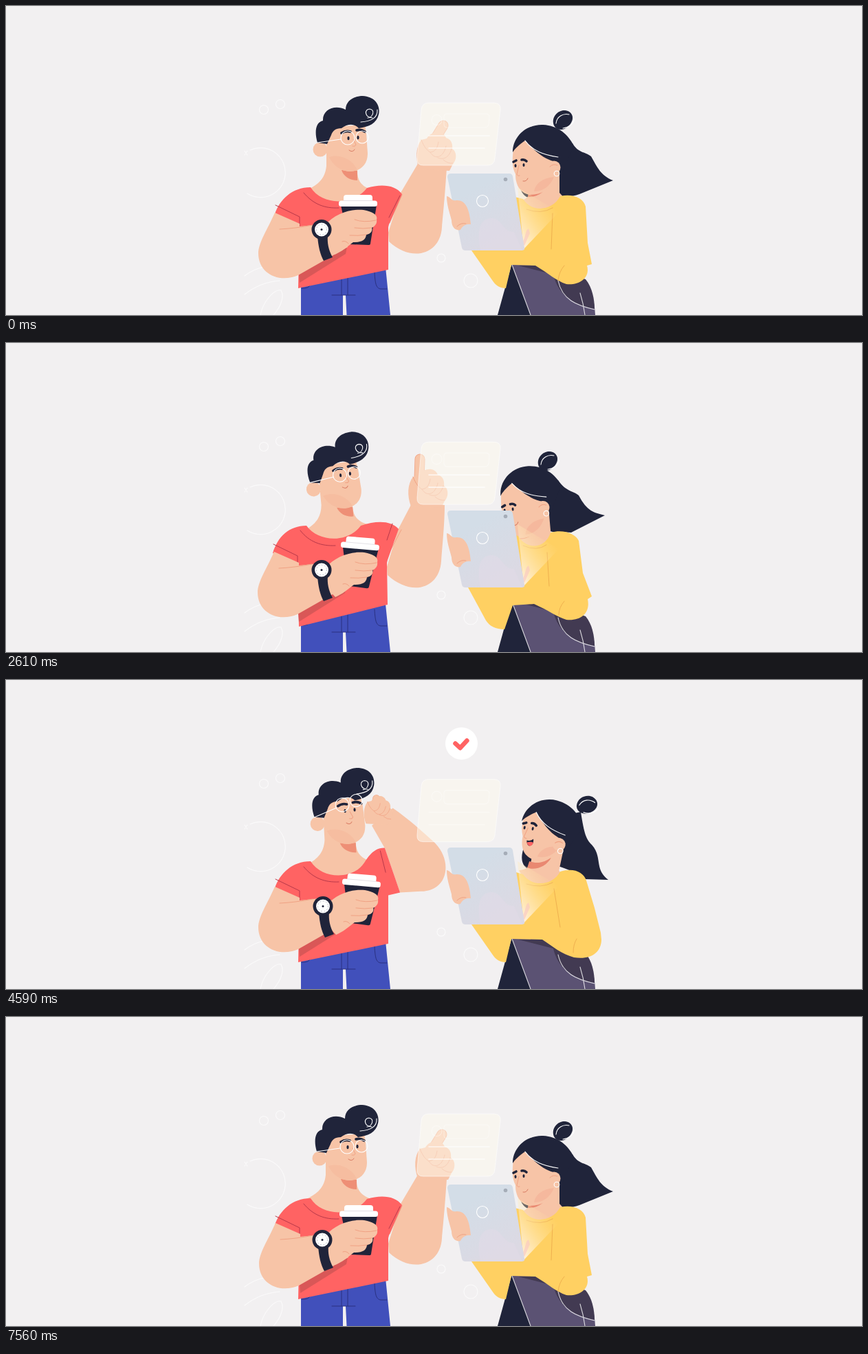
These frames come from a looping animation (1245x450 px, 7.59 s). An HTML page:

```html
<!DOCTYPE html>
<html lang="en">
<head>
<meta charset="utf-8">
<title>Two people with a tablet</title>
<style>
  html, body { margin: 0; width: 100%; height: 100%; overflow: hidden; background: #f2f0f1; }
  svg { display: block; width: 100vw; height: 100vh; }
  .skin { fill: #f7c4a7; }
  .navy { fill: #20243a; }
  .red { fill: #ff6363; }
  .white { fill: #fff; }
  .line { fill: none; stroke-linecap: round; stroke-linejoin: round; }
  .fold { stroke: #f0a284; stroke-width: 1; }
  .seam { stroke: #b8394a; stroke-width: 1; }
  .chalk { stroke: #fff; stroke-width: 1.1; }
  .brow { stroke: #20243a; stroke-width: 3.6; }
</style>
</head>
<body>
<svg viewBox="0 0 1245 450">
  <defs>
    <linearGradient id="glass" x1="0" y1="0" x2=".6" y2="1">
      <stop offset=".3" stop-color="#d3dde7"/><stop offset="1" stop-color="#dcd9e3"/>
    </linearGradient>
    <linearGradient id="glow" x1="0" y1=".8" x2=".7" y2=".1">
      <stop offset="0" stop-color="#fff4e8" stop-opacity=".9"/><stop offset="1" stop-color="#ffe39a" stop-opacity="0"/>
    </linearGradient>
  </defs>

  <g class="line chalk" opacity=".65">
    <circle cx="375" cy="151" r="6.5"/><circle cx="399" cy="143" r="6.5"/>
    <circle cx="633" cy="367" r="6"/><circle cx="676" cy="400" r="10"/>
    <path d="M355 210A36 36 0 1 1 351 273M347 211L351 217M351 211L347 217M347 393Q360 383 375 380M347 420Q370 402 398 400M370 450C374 430 390 412 400 414C406 424 398 440 389 450"/>
  </g>

  <!-- Man -->
  <path fill="#4150bb" d="M429 400L552 380L559 450H495.500L494 421H490V450H429Z"/>
  <path class="line" stroke="#2a3080" d="M474 421H508M488 396V421M497 396V421M536 388C537 404 538 411 545 412H554M430 411Q441 412 443 405"/>
  <g id="manHead">
    <path class="skin" d="M466 212V233C464 252 454 260 438 268C460 304 512 300 532 268C516 262 511 254 511 240V212Z"/>
    <path fill="#ee8f76" d="M488 239L511 240V254C500 254 491 248 488 239Z"/>
    <circle class="skin" cx="457" cy="209" r="10.500"/>
    <path class="skin" d="M466 200L474 176L522 173L524 185L526 215C526 233 513 241 500 241C482 240 470 226 467 214Z"/>
    <path fill="#f6bda0" d="M470 220C484 215 504 222 511 239C492 245 477 235 470 220Z"/>
    <path class="navy" d="M453 199C448 182 451 169 461 167C460 151 478 143 494 151C494 137 507 131 519 131C537 132 545 145 542 158C539 171 528 176 513 178C507 171 497 171 488 178C479 178 475 182 473 188L467 201Z"/>
    <path class="line chalk" d="M533 163C521 162 521 150 529 150C538 151 533 163 526 163M540 151C541 163 531 168 516 169"/>
    <path class="line brow" d="M488 185Q494 181 501 183M510 181Q516 179 522 183"/>
    <ellipse class="navy" cx="498" cy="192.500" rx="1.600" ry="2.700"/><ellipse class="navy" cx="512" cy="191.500" rx="1.600" ry="2.700"/>
    <path class="line fold" d="M505 194L509 202Q508 205 504 204"/>
    <path id="manSmile" class="line" stroke="#d87a62" d="M499 210Q504 214 507 209"/>
    <g id="manMouth"><path class="navy" d="M501 207Q505 210 510 209Q510 217 506 217Q502 215 501 207Z"/><path class="red" d="M502 212Q506 210 510 211Q509 217 506 217Q503 216 502 212Z"/></g>
    <g id="glasses" class="line chalk"><circle cx="497" cy="192" r="10"/><circle cx="518" cy="191" r="9"/><path d="M453 199L487 194"/></g>
  </g>
  <path id="manArm" class="skin"/>
  <path id="armFold" class="line fold"/>
  <g id="hand">
    <path id="finger" class="line" stroke="#f0a284" stroke-width="15"/>
    <path class="skin" d="M601 238C595 222 596 205 604 195L612 193C616 184 635 178 640 192C648 194 650 202 649 208C656 212 656 224 650 230L645 240Z"/>
    <path id="fingerSkin" class="line" stroke="#f7c4a7" stroke-width="13.400"/>
    <path class="line fold" d="M604 195C608 205 612 210 617 213C626 212 628 204 629 198M617 213C625 226 637 219 640 204M628 221C638 225 645 219 648 208M636 224Q643 230 650 229"/>
  </g>
  <path id="shirt" class="red"/>
  <path id="shirtSeams" class="line seam"/>
  <g id="frontArm">
    <path fill="#d95757" d="M426 390L497 346L494 361L427 403Z"/>
    <g id="cup">
      <path class="navy" d="M487 290H539L530 346Q530 348 527 348L499 347Z"/>
      <rect class="white" x="491" y="275" width="42" height="14" rx="4"/><rect class="white" x="484" y="283.500" width="56" height="8.500" rx="3.500"/>
      <path class="line" stroke="#e3e1e6" d="M491 283.500H533"/>
    </g>
    <path class="skin" d="M391 301C380 326 367 345 367 360C367 390 397 404 425 392L497 351L490 330L466 317L427 321V317Z"/>
    <path class="line fold" d="M398 325Q420 324 446 319"/>
    <g id="grip">
      <path class="skin" d="M464 319C478 303 500 295 520 297C535 300 541 305 539 311C540 318 536 321 532 323C534 329 528 333 524 333C523 341 518 344 505 344C497 350 488 358 478 362L462 345Z"/>
      <path class="line fold" d="M507 311Q520 316 538 312M507 323Q519 325 532 323M500 334Q512 335 524 333M498 346Q494 341 489 343"/>
    </g>
    <g id="watch">
      <path class="navy" d="M453 334C454 350 457 362 462 371L475 366C469 355 467 345 468 334Z"/>
      <circle class="navy" cx="459" cy="325.500" r="14.500"/><circle class="white" cx="459" cy="325.500" r="10"/>
      <circle class="line" stroke="#b9bbc6" stroke-dasharray="1 3.400" cx="459" cy="325.500" r="7.500"/><circle class="navy" cx="459" cy="325.500" r="1.500"/>
    </g>
  </g>

  <!-- Floating panel -->
  <g id="panel">
    <path fill="#fffced" fill-opacity=".5" stroke="#fff" stroke-opacity=".55" d="M615 141H709Q720 141 719 151L711 222Q710 232 700 232H607Q597 232 598 222L604 151Q605 141 615 141Z"/>
    <g class="line chalk">
      <path opacity=".35" d="M641 157H698Q703 157 703 162L702 172Q701 177 696 177H642Q637 177 637 172V162Q637 157 641 157M634 166a7.500 7.500 0 1 1-15 0a7.500 7.500 0 1 1 15 0"/>
      <path id="rows" stroke-width="1.600" d="M615 189H703M615 207H696"/>
    </g>
  </g>

  <!-- Woman -->
  <path class="navy" d="M736 374L715 450H766Z"/>
  <path fill="#5b5273" d="M736 377H780L838 396C852 412 856 430 857 450H763Z"/>
  <path fill="#423a52" d="M745 378H784L843 398C853 410 856 428 856 441C828 436 803 422 796 391Z"/>
  <path class="line chalk" stroke-opacity=".8" d="M736 377L763 450M803 400C809 428 830 436 856 442M835 418Q840 434 842 450"/>
  <path id="tail" class="navy"/>
  <g id="womanHead">
    <path class="navy" d="M748 250C746 265 750 276 760 279L774 270Z"/>
    <path class="skin" d="M748 284C764 279 763 270 762 260L805 240V272L816 284C794 308 764 304 748 284Z"/>
    <path fill="#e98871" d="M760 268C773 270 783 264 790 256C786 270 773 279 759 278Z"/>
    <g id="womanFace">
      <path class="skin" d="M738 208C736 225 736 235 741 245C741 260 747 272 761 275C782 275 800 263 803 244L800 205L758 188Z"/>
      <path fill="#f5b89d" d="M768 270C770 257 783 250 797 249C791 263 781 270 768 270Z"/>
      <path class="line brow" stroke-width="2.500" d="M738 227L742 225M750 224Q754 223 757 226"/>
      <ellipse class="navy" cx="741" cy="232.500" rx="1.500" ry="2.500"/><ellipse class="navy" cx="753" cy="231.500" rx="1.500" ry="2.500"/>
      <path class="line fold" d="M746 232L743 245Q744 248 747 247"/>
      <path id="womanSmile" class="line" stroke="#d87a62" d="M752 255Q757 256 759 251"/>
      <g id="womanMouth"><path class="navy" d="M748 250Q754 250 757 246Q760 255 753 257Q749 256 748 250Z"/><path class="red" d="M748.500 253Q754 250 758 251Q757 257 753 257Q750 256 748.500 253Z"/></g>
    </g>
    <path class="navy" d="M737 213C737 190 757 172 781 173C803 174 818 187 826 204L808 244C803 239 806 226 796 226C786 223 774 217 755 196C746 202 740 208 737 213Z"/>
    <path class="line chalk" d="M755 196C766 211 782 217 803 220"/>
    <circle class="skin" cx="797" cy="235" r="9.500"/><path class="line fold" d="M791 234Q796 229 802 232"/>
    <circle class="line chalk" stroke-width="1.800" cx="801" cy="244" r="3.800"/>
  </g>
  <g id="bun">
    <path class="navy" d="M-13 8C-18 -5 -6 -15 3 -14C13 -13 17 -4 12 4C8 11 1 14 -2 14Q-10 14 -13 8Z"/>
    <path class="line chalk" d="M-10 5C-9 -5 0 -10 9 -8M0 12Q14 10 17 -2"/>
  </g>
  <path id="torso" fill="#ffd062"/>
  <path id="sleeveFold" class="line" stroke="#efb04f"/>
  <path fill="url(#glow)" d="M744 264L804 300L753 354Z"/>
  <path fill="#f9c8c2" opacity=".65" d="M750 345C757 337 754 328 760 324L762 331L754 349Z"/>
  <g id="tablet">
    <path fill="url(#glass)" d="M647 244H732Q736 244 737 248L754 352Q755 356 750 356H668Q664 356 663 352L642 249Q642 244 647 244Z"/>
    <path fill="#e2d9e6" opacity=".45" d="M690 356C684 325 690 309 706 309C721 308 723 330 739 329L751 356Z"/>
    <circle cx="726.500" cy="252.500" r="2.800" fill="#a5adb8"/><circle class="line chalk" cx="693" cy="284" r="8.500"/>
    <path class="skin" d="M641 277C647 278 648 285 655 283C667 282 674 293 676 318C669 317 664 320 661 326C654 328 648 322 648 312C645 300 641 290 641 277Z"/>
    <path class="line fold" d="M656 321Q662 315 669 317"/>
  </g>

  <g id="badge">
    <circle class="white" r="23.500"/>
    <path id="tick" class="line" stroke="#ff6363" stroke-width="6.500" stroke-dasharray="29 60" d="M-9 0L-2 6.500L10 -6.500"/>
  </g>
</svg>
<script>
const LOOP = 7590;
const NUMBER = /-?\d+(\.\d+)?/g;
const byId = id => document.getElementById(id);
const ease = k => k * k * (3 - 2 * k);

// Blend two strings that share the same layout of numbers.
function blend(a, b, k) {
  const goals = b.match(NUMBER);
  let i = 0;
  return a.replace(NUMBER, v => (+v + (goals[i++] - v) * k).toFixed(2));
}

function sample(keys, poses, t) {
  const next = keys.findIndex(key => key[0] > t);
  const [t0, a] = keys[next - 1], [t1, b] = keys[next];
  return blend(poses[a], poses[b], ease((t - t0) / (t1 - t0)));
}

// Keys are [time, pose]; repeated poses hold.
const manKeys = [[0, 0], [100, 0], [700, 1], [1600, 1], [2250, 2], [3150, 2], [3750, 3],
  [4100, 3], [4700, 4], [6300, 4], [7050, 5], [LOOP, 5]];
const womanKeys = [[0, 0], [700, 0], [1300, 1], [2650, 1], [3600, 2], [4000, 2], [4500, 3],
  [5500, 3], [6100, 4], [6300, 4], [6950, 0], [LOOP, 0]];
const torsoKeys = [[0, 0], [700, 0], [1300, 1], [1700, 1], [2200, 2], [2650, 2], [3400, 1],
  [4000, 1], [4500, 3], [7100, 3], [7500, 0], [LOOP, 0]];
const between = (from, to) => [[0, 0], [from, 0], [from + 120, 1], [to, 1], [to + 120, 0], [LOOP, 0]];

const tracks = [];
const track = (id, attr, keys, poses) => tracks.push({ node: byId(id), attr, keys, poses });

const headPose = (turn, x, y) => `translate(${x} ${y}) rotate(${turn} 495 280)`;
track("manHead", "transform", manKeys, [headPose(0, 0, 0), headPose(-4.5, -2, 0), headPose(-5.5, -3, 0),
  headPose(0, 0, 0), headPose(-3.5, 0, -2), headPose(0, -1, -3)]);
const level = "rotate(0 455 200)";
track("glasses", "transform", manKeys, [level, level, level, level, "rotate(-13 455 200)", level]);

const raisedArm = "M556 330L574 272L600 228L641 236C638 280 636 300 634 322C632 362 590 374 557 343Z";
track("manArm", "d", manKeys, [
  raisedArm,
  "M554 328L570 274L601 232L646 238C638 280 633 300 630 318C626 360 585 370 554 341Z",
  "M554 326L570 272L592 230L638 236C638 265 634 300 633 318C630 358 590 370 555 338Z",
  "M564 326L570 264L606 212L653 214C654 245 645 270 643 293C640 340 610 350 564 326Z",
  "M574 308L549 243L525 212L554 184C580 199 605 219 622 232C652 258 645 304 607 306Z",
  raisedArm]);
track("armFold", "d", manKeys, ["M558 316L576 275", "M558 308L577 276", "M557 306L575 272",
  "M576 280L600 240", "M522 197L534 197", "M558 316L576 275"]);

const handPose = (x, y, size) => `translate(${x} ${y}) translate(625 212) scale(${size}) translate(-625 -212)`;
track("hand", "transform", manKeys, [handPose(0, 0, 1), handPose(0, 0, 1), handPose(-12, 0, 1),
  handPose(3, -22, 1), handPose(-92, -22, 0.72), handPose(-2, -3, 1)]);
const fingers = ["M620 200L636 174", "M618 200L620 173", "M613 198L614 169",
  "M614 202L617 174", "M620 202L622 190", "M620 200L636 174"];
track("finger", "d", manKeys, fingers);
track("fingerSkin", "d", manKeys, fingers);

const shirtLeft = "M443 264C416 264 398 282 391 303L427 320L425 411L556 384";
const neckline = "C505 291 460 291 443 264Z";
const shirtRest = shirtLeft + "L556 322L557 318L576 274C566 260 545 259 525 265" + neckline;
const shirtLean = "M437 266C412 266 395 282 388 306L424 323L426 413L555 381L554 320L555 316L571 271C561 259 540 258 516 266C498 291 455 291 437 266Z";
track("shirt", "d", manKeys, [shirtRest, shirtLean, shirtLean,
  shirtLeft + "L556 320L564 326L570 261C560 253 538 254 521 268" + neckline,
  shirtLeft + "L556 313L574 308L549 243C538 243 530 250 521 266" + neckline, shirtRest]);
const seams = "M392 290L427 307L427 322M433 272C447 289 464 295 484 294";
const seamRest = seams + "M573 276L557 308";
const seamLean = "M389 293L424 310L424 325M428 273C441 290 459 296 479 295M562 263L554 287";
track("shirtSeams", "d", manKeys, [seamRest, seamLean, seamLean,
  seams + "M558 256L554 292", seams + "M543 248L552 279", seamRest]);

const shift = (x, y) => `translate(${x} ${y})`;
track("frontArm", "transform", manKeys, [shift(0, 0), shift(-1, 3), shift(-1, 3), shift(0, 0), shift(0, 0), shift(1, -1)]);
const tilt = (x, y, turn) => shift(x, y) + ` rotate(${turn} 512 310)`;
track("cup", "transform", manKeys, [tilt(0, 0, 0), tilt(-1, -2, 0), tilt(2, 5, 5), tilt(3, 8, 5), tilt(3, 8, 5), tilt(0, 0, 0)]);
track("grip", "transform", manKeys, [shift(0, 0), shift(-1, -2), shift(2, 5), shift(2, 9), shift(2, 9), shift(0, 0)]);
track("watch", "transform", manKeys, [shift(0, 0), shift(-2, -2), shift(1, 2), shift(2, 4), shift(2, 4), shift(0, 0)]);

const leanPose = (turn, x, y) => `translate(${x} ${y}) rotate(${turn} 790 280)`;
track("womanHead", "transform", womanKeys, [leanPose(0, 0, 0), leanPose(-5, -12, 5),
  leanPose(5, -7, 6), leanPose(12, -2, 2), leanPose(3, 2, 7)]);
track("womanFace", "transform", womanKeys, [shift(0, 0), shift(0, 2), shift(0, -4), shift(2, -11), shift(-1, -3)]);
const bunPose = (x, y, turn) => `translate(${x} ${y}) rotate(${turn})`;
track("bun", "transform", womanKeys, [bunPose(810, 166, 0), bunPose(788, 172, 0),
  bunPose(824, 183, 25), bunPose(845, 182, 25), bunPose(822, 178, 12)]);
track("tail", "d", womanKeys, [
  "M790 200L824 200C832 214 842 212 851 219C860 235 865 247 883 254L834 274C825 278 815 277 805 277L790 270Z",
  "M775 205L803 200C815 217 825 215 833 222C845 245 855 247 871 251L822 276C812 275 800 276 795 275L775 270Z",
  "M790 205L820 200C825 235 835 235 845 243C855 262 852 275 868 289L835 292C830 283 815 275 800 272L785 270Z",
  "M800 200L836 192C841 225 844 232 852 240C868 258 855 275 876 291L842 290C830 280 815 275 806 272L790 270Z",
  "M790 205L824 203C832 220 842 218 853 224C864 242 868 250 888 258L845 275C830 280 815 279 806 279L790 270Z"]);

const leftSleeve = "L735 377L727 411C718 411 712 407 707 399L677 356L700 300Z";
const leanSleeve = "L737 382L725 417C712 417 703 412 698 404L672 356L700 300Z";
const leanNeck = "M735 278L745 281C757 302 785 300 792 276C812 271 828 278 833 288";
track("torso", "d", torsoKeys, [
  "M740 278L752 281C765 302 795 298 806 277C825 273 840 280 843 292L846 345L852 376L845 378C850 395 835 407 815 405C800 400 790 390 770 378" + leftSleeve,
  leanNeck + "L850 326L864 360L865 372C865 390 850 402 826 398C805 392 795 385 780 380" + leanSleeve,
  leanNeck + "L839 335L852 369L846 373C850 392 838 405 815 403C800 398 790 390 768 380" + leanSleeve,
  "M742 280L752 283C765 302 795 300 806 279C826 273 840 280 844 292L856 332L865 368L866 378C866 397 850 408 826 404C808 399 795 388 780 378" + leftSleeve]);
track("sleeveFold", "d", torsoKeys, [
  "M795 302L793 354M803 400Q804 387 812 378M757 296Q778 304 795 294", "M791 308L804 357M826 393Q825 381 830 373M752 295Q772 304 786 294",
  "M787 305L790 354M804 396Q804 385 812 376M752 295Q772 304 786 294", "M797 304L806 360M825 397Q825 385 830 377M757 297Q778 304 795 295"]);
track("tablet", "transform", [[0, 0], [5600, 0], [6150, 1], [6300, 1], [6700, 0], [LOOP, 0]], [shift(0, 0), shift(0, 3)]);

const manTalks = between(5550, 6350), womanTalks = between(4350, 6450);
track("manMouth", "opacity", manTalks, ["0", "1"]);
track("manSmile", "opacity", manTalks, ["1", "0"]);
track("womanMouth", "opacity", womanTalks, ["0", "1"]);
track("womanSmile", "opacity", womanTalks, ["1", "0"]);

const badgePose = (y, size) => `translate(662.5 ${y}) scale(${size})`;
track("badge", "transform", [[0, 0], [3940, 0], [4300, 1], [4600, 2], [6700, 2], [6850, 3], [7200, 4], [LOOP, 4]],
  [badgePose(69, 0), badgePose(84, 1.3), badgePose(92.5, 1), badgePose(92.5, 1.25), badgePose(92.5, 0)]);
track("tick", "stroke-dashoffset", [[0, 0], [4250, 0], [4700, 1], [LOOP, 1]], ["33", "0"]);

function draw(now) {
  const t = now % LOOP;
  for (const { node, attr, keys, poses } of tracks) node.setAttribute(attr, sample(keys, poses, t));
  const wave = Math.cos(t / LOOP * 2 * Math.PI);
  byId("panel").setAttribute("transform", shift(0, 2 - 2 * wave));
  byId("rows").setAttribute("opacity", 0.45 + 0.25 * Math.cos(t / LOOP * 12 * Math.PI));
  requestAnimationFrame(draw);
}
draw(0);
</script>
</body>
</html>
```
